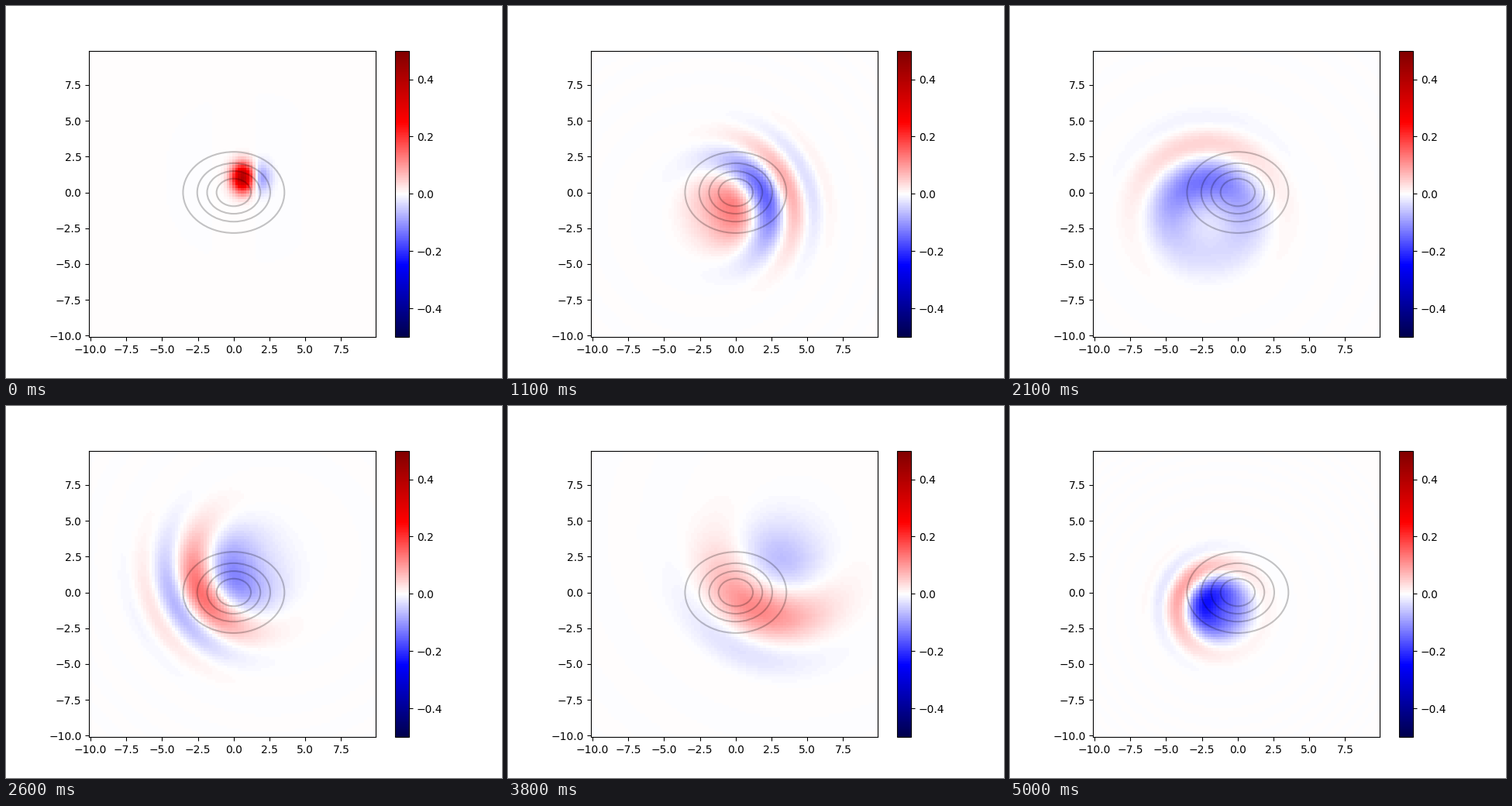
A matplotlib script for the animation above (5100 ms loop, 640 px wide and 480 px high).

```python
import numpy as np
import matplotlib.pyplot as plt
from matplotlib.animation import FuncAnimation
from matplotlib.patches import Ellipse

FRAMES, INTERVAL = 51, 100
DT = 0.4        # simulated time per frame
OMEGA = 0.5     # oscillator frequency
A0 = 2.0        # initial packet: exp(-A0 r^2 / 2)
R0 = np.array([1.0, 1.0])
P0 = np.array([1.0, 0.0])

N, HALF = 100, 10
STEP = 2 * HALF / N
axis = -HALF + STEP * np.arange(N)
X, Y = np.meshgrid(axis, axis)


def packet(t):
    """Real part of a squeezed Gaussian packet in a 2D harmonic well."""
    c, s = np.cos(OMEGA * t), np.sin(OMEGA * t)
    r = R0 * c + P0 / OMEGA * s
    p = P0 * c - OMEGA * R0 * s
    spread = c + 1j * A0 / OMEGA * s
    a = (A0 * c + 1j * OMEGA * s) / spread
    phase = P0 @ R0 + (p @ r - P0 @ R0) / 2
    dx, dy = X - r[0], Y - r[1]
    psi = np.exp(-a / 2 * (dx**2 + dy**2)
                 + 1j * (p[0] * dx + p[1] * dy + phase))
    return (psi / spread).real / np.sqrt(np.pi)


fig, ax = plt.subplots(figsize=(6.4, 4.8), dpi=100)
low, high = -HALF - STEP / 2, HALF - STEP / 2
image = ax.imshow(packet(0), cmap="seismic", vmin=-0.5, vmax=0.5,
                  origin="lower", extent=(low, high, low, high),
                  interpolation="nearest")
fig.colorbar(image)

# Level lines of the background well
for radius in (1.2, 1.86, 2.55, 3.54):
    ax.add_patch(Ellipse((0, 0), 2 * radius, 1.6 * radius, fill=False,
                         edgecolor="black", linewidth=1.5, alpha=0.23))


def update(frame):
    image.set_data(packet(frame * DT))
    return [image]


anim = FuncAnimation(fig, update, frames=FRAMES, interval=INTERVAL,
                     repeat=True, repeat_delay=0)
plt.show()
```
